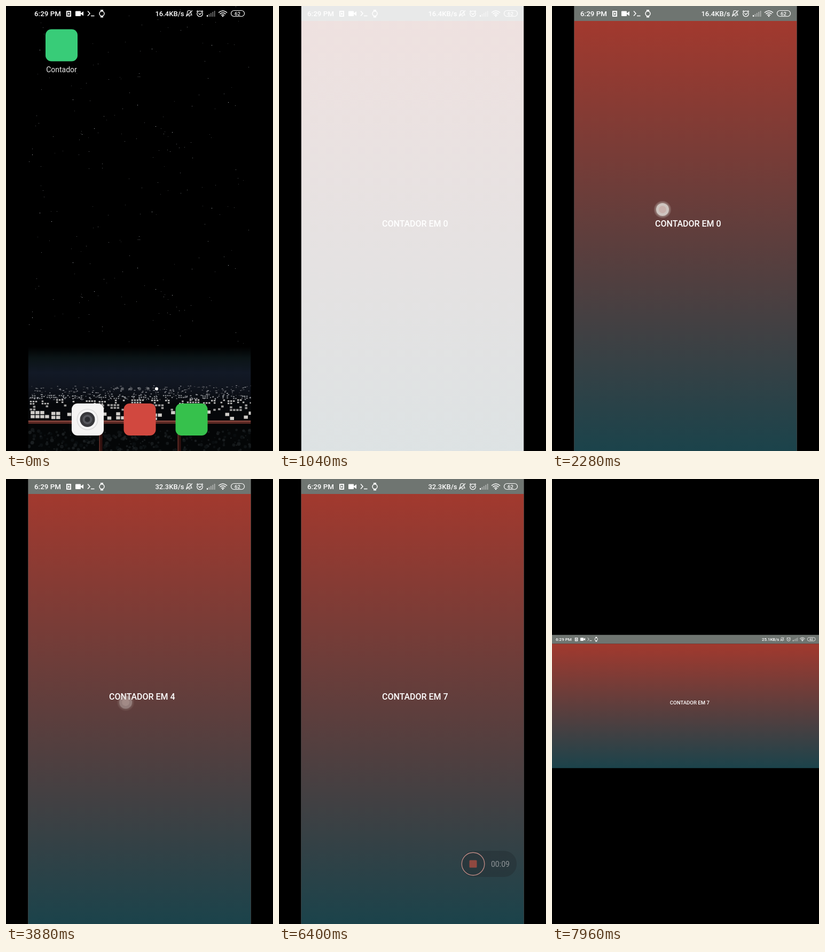
Animation of 500 by 833 pixels, one loop 8000 ms. Source, as an HTML page with a canvas:

```html
<!DOCTYPE html>
<html lang="pt">
<head>
<meta charset="utf-8">
<style>
  html, body { margin: 0; width: 100%; height: 100%; overflow: hidden; background: #000; }
  canvas { display: block; width: 500px; height: 833px; }
</style>
</head>
<body>
<canvas id="stage" width="500" height="833"></canvas>
<script>
const ctx = document.getElementById('stage').getContext('2d');
const LOOP = 8000, LEFT = 41.5, WIDTH = 417, HEIGHT = 833, BAR = 28;
const FIRST_TAP = 2400, TAP_GAP = 475, TAPS = 7;
const TURN_START = 6840, TURN_TIME = 433;

const clamp = v => Math.max(0, Math.min(1, v));
const progress = (t, from, length) => clamp((t - from) / length);
const easeOut = p => 1 - (1 - p) ** 3;
const mix = (a, b, p) => a + (b - a) * p;

function scoped(draw) { ctx.save(); draw(); ctx.restore(); }

function rect(x, y, w, h, color) {
  ctx.fillStyle = color;
  ctx.fillRect(x, y, w, h);
}

function rounded(x, y, w, h, r, color) {
  ctx.fillStyle = color;
  ctx.beginPath();
  ctx.roundRect(x, y, w, h, r);
  ctx.fill();
}

function disc(x, y, r, color) {
  ctx.fillStyle = color;
  ctx.beginPath();
  ctx.arc(x, y, r, 0, 7);
  ctx.fill();
}

function text(str, x, y, size, weight = 500, align = 'left', color = '#fff') {
  ctx.font = `${weight} ${size}px Roboto, sans-serif`;
  ctx.textAlign = align;
  ctx.fillStyle = color;
  ctx.fillText(str, x, y);
}

function line(path, width = 1.3, color = '#fff') {
  ctx.strokeStyle = color;
  ctx.lineWidth = width;
  ctx.stroke(new Path2D(path));
}

function circlePath(x, y, r) {
  return `M${x - r} ${y}a${r} ${r} 0 1 0 ${2 * r} 0a${r} ${r} 0 1 0 ${-2 * r} 0`;
}

function randomFrom(seed) {
  return () => (seed = (seed * 16807) % 2147483647) / 2147483647;
}

// Status bar content for a screen of the given width
function statusBar(width, rate) {
  text('6:29 PM', 11.5, 19, 13.4);
  line('M72.500 10H79.500V19H72.500Z', 2);
  rect(74.7, 12.5, 2.6, 4, '#fff');
  rounded(88.5, 9.5, 10, 9.5, 1, '#fff');
  ctx.fill(new Path2D('M97.500 14.2L103.500 10V18.5Z'));
  line('M111.500 9.5L115.500 14L111.500 18.5M117.500 18.5H124', 1.5);
  rect(135.5, 7, 5, 3, '#fff');
  rect(135.5, 18.5, 5, 3, '#fff');
  line(circlePath(138, 14.2, 4.5), 1.5);
  scoped(() => {
    ctx.translate(width - WIDTH + .5, 0);
    text(rate, 291.5, 19, 13, 500, 'right');
    line('M296 17H306L304.500 14V12A3.500 3.500 0 0 0 297.500 12V14ZM300 19H303M295 19.500L307 8.500', 1.2);
    line(circlePath(321, 14.5, 5.2));
    line('M318.500 13.500L321 16L324 13M315 10.500L317.500 8.500M327 10.500L324.500 8.500');
    for (let i = 0; i < 5; i++)
      rect(334 + i * 3.4, 17 - i * 2, 2, 3 + i * 2, i ? 'rgba(255,255,255,.4)' : '#fff');
    line('M356 12.500Q364 5.500 372 12.500M358.500 15Q364 10.500 369.500 15M361 17.500Q364 15 367 17.500', 1.6);
    disc(364, 19, 1.3, '#fff');
    ctx.beginPath();
    ctx.roundRect(379.5, 8.5, 25, 11, 5.5);
    ctx.lineWidth = 1.2;
    ctx.stroke();
    text('62', 391.5, 17.6, 9.5, 500, 'center');
  });
}

function appScreen(width, height, textX, textY, count, rate, fade = 1, barWidth = width) {
  scoped(() => {
    ctx.globalAlpha *= fade;
    const sky = ctx.createLinearGradient(0, BAR, 0, height);
    sky.addColorStop(0, '#a2392e');
    sky.addColorStop(1, '#1b434b');
    rect(0, BAR, width, height - BAR, sky);
    rect(0, 0, width, BAR, '#6f7571');
  });
  statusBar(barWidth, rate);
  text('CONTADOR EM ' + count, textX, textY, 16);
}

// Rows of lit windows grouped into buildings
function windows(rnd, y, size, rows, lit, color) {
  for (let x = rnd() * 6; x < WIDTH; x += 2 + rnd() * size * 3) {
    const cols = 2 + rnd() * 4 | 0, top = y + rnd() * size;
    for (let c = 0; c < cols; c++, x += size + 1.5)
      for (let r = 0; r < rows; r++)
        if (rnd() < lit) rect(x, top + r * (size * .8 + 1.5), size, size * .8, color);
  }
}

function city() {
  const rnd = randomFrom(4711);
  const sky = ctx.createLinearGradient(0, 638, 0, 745);
  sky.addColorStop(0, '#000');
  sky.addColorStop(.2, '#0b1416');
  sky.addColorStop(.45, '#121926');
  sky.addColorStop(.7, '#10151f');
  sky.addColorStop(1, '#05070a');
  rect(0, 638, WIDTH, 138, sky);

  // The star field repeats vertically
  const bright = [[7, 278], [343, 73], [100, 240], [83, 175], [123, 229], [238, 225], [269, 236],
                  [21, 82], [43, 98], [231, 80], [374, 180], [204, 185]];
  const stars = bright.map(([x, y]) => [x, y, .85]);
  for (let i = 0; i < 100; i++) stars.push([rnd() * WIDTH | 0, rnd() * 305 | 0, .2 + rnd() * .35]);
  for (const [x, y, a] of stars)
    for (let top = 0; top < 640; top += 305)
      if (y + top < 636) rect(x + .5, y + top, 1, 1, `rgba(225,230,235,${a})`);

  for (let i = 0; i < 330; i++) {
    const depth = rnd(), shade = 45 + rnd() * 120 | 0;
    rect(rnd() * WIDTH, 710 + depth * 26, 1 + rnd() * 3, 1 + depth, `rgb(${shade},${shade + 2},${shade + 8})`);
  }
  windows(rnd, 728, 2.5, 2, .6, '#8d9094');
  windows(rnd, 736, 3.5, 2, .65, '#b9b8b6');
  windows(rnd, 745, 4.5, 2, .5, '#9b9a99');
  windows(rnd, 757, 7.5, 2, .65, '#cfccc8');

  rect(0, 775, WIDTH, 58, '#040607');
  for (let i = 0; i < 260; i++) {
    const shade = 8 + rnd() * 20 | 0;
    disc(rnd() * WIDTH, 793 + rnd() * 40, 1 + rnd() * 2.5, `rgb(${shade},${shade + 4},${shade + 6})`);
  }
  rect(0, 776, WIDTH, 6, '#5c2924');
  rect(0, 776, WIDTH, 2, '#8c4940');
  for (const x of [133, 280]) {
    rect(x, 782, 6, 51, '#32110f');
    rect(x, 782, 1.5, 51, '#69312a');
  }
}

function homeScreen() {
  city();
  statusBar(WIDTH, '16.4KB/s');
  rounded(32.5, 43.5, 60, 60, 11, '#38cc78');
  text('Contador', 62.5, 124, 14, 400, 'center', '#e8e8e8');
  for (let i = 0; i < 5; i++) disc(176.5 + i * 16, 716.5, 3, i < 4 ? 'rgba(255,255,255,.25)' : '#fff');
  rounded(81.5, 744, 60, 60, 11, '#f5f4f3');
  disc(111, 774, 20, '#dedddd');
  disc(111, 774, 18.5, '#f6f6f6');
  disc(111, 774, 14, '#38383c');
  disc(111, 774, 9, '#55565c');
  disc(111, 774, 5, '#2a2b30');
  rounded(179, 744, 60, 60, 11, '#d1483f');
  rounded(276, 744, 60, 60, 11, '#36c14c');
}

function openingWindow(t) {
  const p = easeOut(progress(t, 40, 420));
  if (p <= 0) return;
  scoped(() => {
    ctx.globalAlpha = clamp(p * 2.5);
    rounded(mix(32, 0, p), mix(43, 0, p), mix(60, WIDTH, p), mix(60, HEIGHT, p), 14 * (1 - p), '#fafafa');
  });
}

function touches(t) {
  for (let i = 0; i < TAPS; i++) {
    const release = FIRST_TAP + i * TAP_GAP;
    const alpha = Math.min(progress(t, release - 180, 50), 1 - progress(t, release, 90));
    if (alpha <= 0) continue;
    const step = Math.min(i, 4), x = 165.5 + step * 5.7, y = 381 + step * 12.3;
    scoped(() => {
      ctx.globalAlpha = alpha;
      disc(x, y, 16, 'rgba(200,190,185,.22)');
      disc(x, y, 14, 'rgba(200,190,185,.25)');
      disc(x, y, 12, 'rgba(218,212,207,.85)');
      disc(x, y, 7, 'rgba(200,172,166,.7)');
    });
  }
}

function recorderPill(t) {
  const alpha = progress(t, 6160, 220);
  if (alpha <= 0) return;
  scoped(() => {
    ctx.globalAlpha = alpha;
    rounded(299.5, 696, 104, 49, 24, 'rgba(38,48,54,.55)');
    line(circlePath(322, 720.5, 21.3), 1.4, '#b98883');
    rounded(315, 713.5, 14, 14, 1.5, '#8f4840');
    text('00:09', 355.5, 726, 14, 400, 'left', '#8f9497');
  });
}

function portrait(t, count, rate) {
  if (t < 1040) {
    if (t < 470) homeScreen();
    openingWindow(t);
    if (t >= 470) statusBar(WIDTH, '16.4KB/s');
    return;
  }
  rect(0, 0, WIDTH, HEIGHT, '#fafafa');
  appScreen(WIDTH, HEIGHT, 151.5, 413, count, rate, progress(t, 1000, 320));
  touches(t);
  recorderPill(t);
}

function landscape(t, count, rate) {
  const p = progress(t, TURN_START, TURN_TIME);
  const left = 1 - easeOut(p);
  const w = 500 - 250 * left, h = 250 + 250 * left;
  ctx.beginPath();
  ctx.rect(0, 291.5, 500, 250);
  ctx.clip();
  ctx.translate(250, 416.5);
  ctx.rotate(left * Math.PI / 2);
  ctx.beginPath();
  ctx.rect(-w / 2, -h / 2, w, h);
  ctx.clip();
  // The upright screen is stretched to the turning box and fades under the new layout
  if (p < 1) scoped(() => {
    ctx.scale(w / WIDTH, h / HEIGHT);
    ctx.translate(-WIDTH / 2, -HEIGHT / 2);
    appScreen(WIDTH, HEIGHT, 151.5, 413, count, rate);
  });
  ctx.globalAlpha = clamp(p * 1.8);
  rect(-w / 2, -h / 2, w, h / 2 - 124, '#6f7571');
  ctx.translate(-250, -125);
  ctx.scale(.6, .6);
  appScreen(834, 417, 368, 218, count, rate, 1, p < .75 ? WIDTH : 834);
}

function draw(t) {
  const count = t < FIRST_TAP ? 0 : Math.min(TAPS, 1 + Math.floor((t - FIRST_TAP) / TAP_GAP));
  const rate = t < 3200 ? '16.4KB/s' : t < 7800 ? '32.3KB/s' : '25.1KB/s';
  rect(0, 0, 500, 833, '#000');
  scoped(() => {
    if (t >= TURN_START) return landscape(t, count, rate);
    ctx.beginPath();
    ctx.rect(LEFT, 0, WIDTH, HEIGHT);
    ctx.clip();
    ctx.translate(LEFT, 0);
    portrait(t, count, rate);
  });
}

const start = performance.now();
function tick() {
  draw((performance.now() - start) % LOOP);
  requestAnimationFrame(tick);
}
tick();
</script>
</body>
</html>
```
